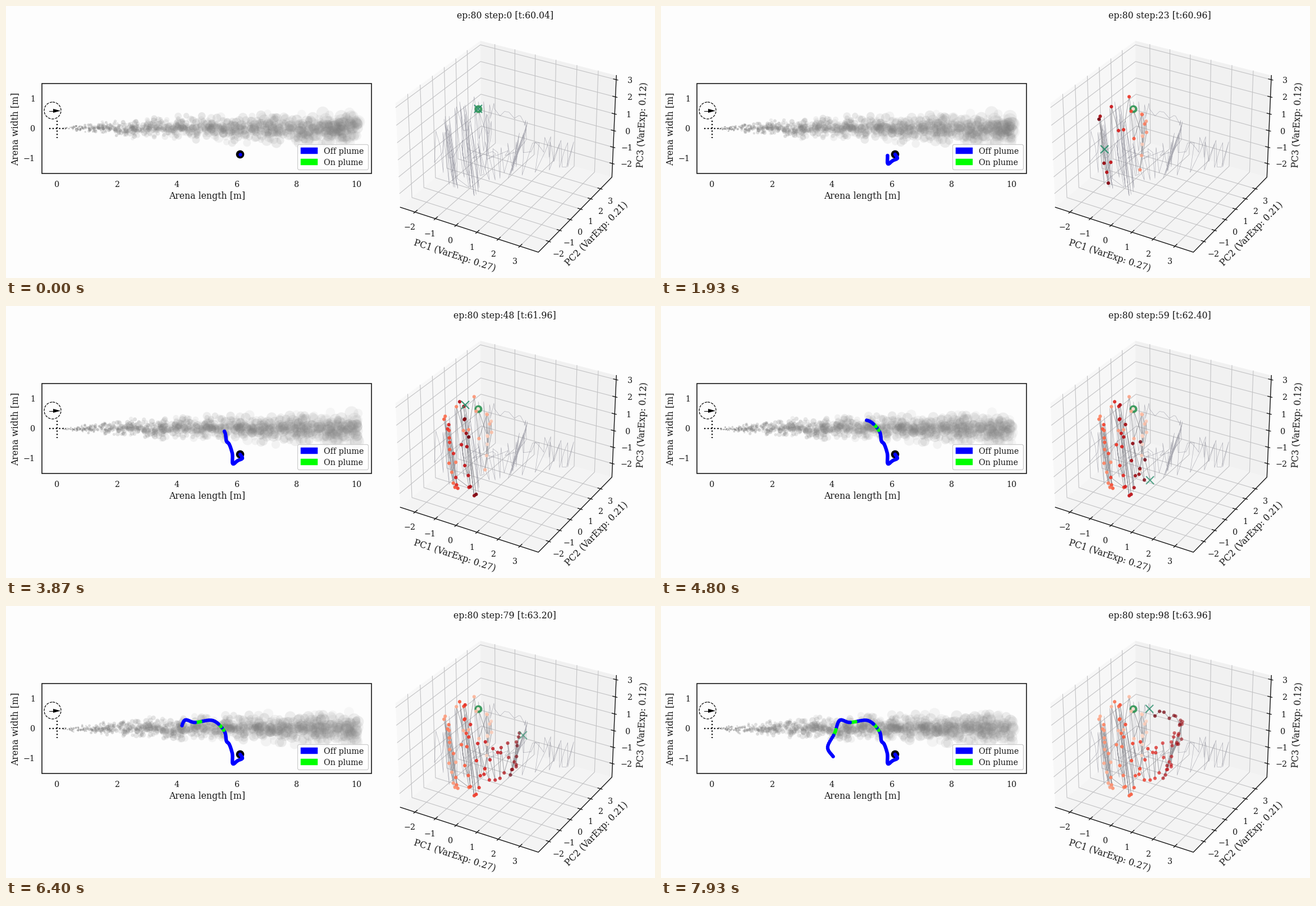
Recreate the animation shown at these times as a matplotlib script. Size 1156 px wide and 484 px high, loop 8 s.

```python
import numpy as np
import matplotlib.pyplot as plt
from matplotlib.animation import FuncAnimation
from matplotlib.patches import Circle, FancyBboxPatch, Polygon, Rectangle

W, H, DPI = 1156, 484, 64
PT = 72 / DPI                       # points per pixel
FRAMES, LOOP_MS = 120, 8000
BIG, SMALL = 15.7, 14.25            # text sizes in pixels
INK, GRID = "#141414", "#c2c2c4"
STEPS = np.arange(100)

plt.rcParams["font.family"] = "DejaVu Serif"
rng = np.random.default_rng(80)
fig = plt.figure(figsize=(W / DPI, H / DPI), dpi=DPI, facecolor="#fdfdfd")
ax = fig.add_axes([0, 0, 1, 1])
ax.set(xlim=(0, W), ylim=(H, 0))
ax.axis("off")


def label(x, y, text, size=SMALL, angle=0, ha="center"):
    """Text whose capitals are centred on (x, y)."""
    a, drop = np.radians(angle), 0.36 * size
    return ax.text(x + drop * np.sin(a), y + drop * np.cos(a), text, color=INK,
                   fontsize=size * PT, rotation=angle, rotation_mode="anchor",
                   ha=ha, va="baseline", zorder=9)


def line(points, color=INK, width=1.0, z=2, **kw):
    return ax.plot(*np.transpose(points), color=color, lw=width * PT, zorder=z, **kw)[0]


def dots(diameter, z):
    return ax.scatter([], [], s=(diameter * PT) ** 2, linewidths=0, zorder=z)


def signed(v):
    return str(v).replace("-", "\u2212")


def smooth(keys, t):
    """Cubic Hermite curve through rows of (time, x, y)."""
    k, p = keys[:, 0], keys[:, 1:]
    m = np.gradient(p, k, axis=0)
    i = np.clip(np.searchsorted(k, t, side="right") - 1, 0, len(k) - 2)
    h = (k[i + 1] - k[i])[:, None]
    u = (t - k[i])[:, None] / h
    return ((1 + 2 * u) * (1 - u) ** 2 * p[i] + u * (1 - u) ** 2 * h * m[i]
            + u ** 2 * (3 - 2 * u) * p[i + 1] + u ** 2 * (u - 1) * h * m[i + 1])


# ---------- arena ----------
UNIT, X0, Y0 = 53.35, 91.0, 218.0


def arena(x, y):
    return np.column_stack([X0 + UNIT * x, Y0 - UNIT * y])


ax.add_patch(Rectangle((64, 138), 587, 159.7, fill=False, ec=INK, lw=1.6 * PT, zorder=6))
for v in range(0, 11, 2):
    label(X0 + UNIT * v, 317, str(v))
for v in (-1, 0, 1):
    label(52, Y0 - UNIT * v, signed(v), ha="right")
label(358, 337, "Arena length [m]", BIG)
label(16, 219, "Arena width [m]", BIG, 90)

# wind compass and odour source
ax.add_patch(Circle((83, 186), 15, fill=False, ec="black", lw=1.2 * PT, ls="--", zorder=5))
line([(77, 186.5), (85, 186.5)], "black")
ax.add_patch(Polygon([(84, 183), (97, 186.5), (84, 190)], fc="black", lw=0, zorder=5))
line([(76.5, 218), (107, 218)], "black", 2.2, 5, ls=":")
line([(91, 203.5), (91, 235)], "black", 2.2, 5, ls=":")

# legend
ax.add_patch(FancyBboxPatch((522, 249), 121, 40, boxstyle="round,pad=2.5,rounding_size=3",
                            fc=(1, 1, 1, 0.8), ec="#cccccc", lw=1.2 * PT, zorder=7))
for y, color, name in ((257.5, "blue", "Off plume"), (277.7, "lime", "On plume")):
    ax.add_patch(Rectangle((525, y - 5.5), 30, 11, fc=color, ec=color, lw=0.5, zorder=8))
    label(566, y, name, ha="left")

# puffs drift downwind, widening and thinning as they go
N = 1150
birth = np.sort(rng.uniform(-2.0, 10.1, N))
spread = np.clip(rng.normal(0, 1, N), -2.4, 2.4)
swirl = rng.uniform(0, 2 * np.pi, N)
strength = rng.uniform(0.5, 1.25, N)
size_var = rng.uniform(0.65, 1.2, N)
puffs = ax.scatter([], [], linewidths=0, zorder=2)


def draw_plume(step):
    x = birth + 0.02 * step
    on = (x > 0.2) & (x < 10.05)
    x = x[on]
    sigma = 0.22 * (1 - np.exp(-x / 3))
    y = sigma * (spread[on] + 0.2 * np.sin(swirl[on] + 1.3 * x))
    y += 0.02 * np.sin(1.9 * birth[on])
    radius = np.maximum(2.1 * x ** 0.7, 0.8) * size_var[on]
    rgba = np.full((len(x), 4), 0.5)
    rgba[:, 3] = np.clip(0.34 / np.sqrt(x), 0, 0.5) * strength[on]
    puffs.set_offsets(arena(x, y))
    puffs.set_sizes((2 * radius * PT) ** 2)
    puffs.set_facecolors(rgba)


# agent track through a few (step, x, y) points
TRACK = np.array([(0, 417, 264), (4, 421, 271), (8, 413, 275), (14, 405, 281),
                  (25, 403, 262), (34, 397, 245), (39, 393, 241), (48, 389, 223),
                  (58, 369, 204), (69, 334, 207), (75, 319, 203), (83, 309, 227),
                  (90, 297, 250), (99, 308, 270)])
track = smooth(TRACK, STEPS)
BURSTS = np.array([49.5, 52.5, 66, 82])
smelled = np.abs(STEPS[:, None] - BURSTS).min(axis=1) < 1.1
track_rgb = np.where(smelled[:, None], (0, 1, 0), (0, 0, 1)).astype(float)
ax.add_patch(Circle(track[0], 7.3, fc="black", lw=0, zorder=3))
trail = dots(6.4, 4)

# ---------- neural state space ----------
LOW = np.array([-2.73, -2.95, -2.84])
HIGH = np.array([3.84, 4.19, 3.24])
BOX = np.array([1.1428, 1.1428, 0.8572])
AZIM, ELEV = np.radians(-60), np.radians(30)
ca, sa, ce, se = np.cos(AZIM), np.sin(AZIM), np.cos(ELEV), np.sin(ELEV)
VIEW = np.array([(-sa, ca, 0), (-se * ca, -se * sa, ce), (ca * ce, sa * ce, se)])


def project(*p):
    u, v, w = VIEW @ (((np.array(p) - LOW) / (HIGH - LOW) - 0.5) * BOX)
    k = 246.5 * 10 / (10 - w)
    return np.array([894.2 + k * u, 241.3 - k * v])


(xl, yl, zl), (xh, yh, zh) = LOW, HIGH
panes = (
    ([(xl, yl, zl), (xl, yh, zl), (xl, yh, zh), (xl, yl, zh)], "0.95"),
    ([(xl, yh, zl), (xh, yh, zl), (xh, yh, zh), (xl, yh, zh)], "0.90"),
    ([(xl, yl, zl), (xh, yl, zl), (xh, yh, zl), (xl, yh, zl)], "0.925"))
for corners, gray in panes:
    ax.add_patch(Polygon([project(*c) for c in corners], fc=gray, alpha=0.5, lw=0, zorder=0))


def tick(p, toward):
    d = (toward - p) / np.hypot(*(toward - p))
    line([p - 3 * d, p + 5 * d], INK, 1.3, 3)


for v in range(-2, 4):
    grids = ([(v, yl, zl), (v, yh, zl), (v, yh, zh)],
             [(xh, v, zl), (xl, v, zl), (xl, v, zh)],
             [(xl, yl, v), (xl, yh, v), (xh, yh, v)])
    for g in grids:
        line([project(*p) for p in g], GRID, 1.1, 1)
    px, py, pz = project(v, yl, zl), project(xh, v, zl), project(xh, yh, v)
    tick(px, project(v, yh, zl))
    tick(py, project(xl, v, zl))
    tick(pz, project(xl, yh, v))
    for p, (dx, dy) in ((px, (-9.5, 26)), (py, (17, 22)), (pz, (24.5, 0.5))):
        label(p[0] + dx, p[1] + dy, signed(v))
line([project(*p) for p in ((xl, yl, zl), (xh, yl, zl), (xh, yh, zl), (xh, yh, zh))], INK, 1.4, 3)
label(800, 443, "PC1 (VarExp: 0.27)", BIG, -18)
label(1051, 405, "PC2 (VarExp: 0.21)", BIG, 45.7)
label(1132.5, 211, "PC3 (VarExp: 0.12)", BIG, 87.5)
title = label(888.7, 16.5, "", BIG)

# the state swings between two slowly moving ends: (step, x, y, x, y)
ENDS = np.array([
    (0, 841, 183, 862, 240), (8, 874, 195, 855, 290), (13, 833, 157, 833, 200),
    (18, 780, 192, 798, 330), (33, 786, 205, 805, 322), (34, 822, 327, 822, 327),
    (36, 806, 168, 824, 326), (48, 816, 160, 842, 340), (53, 838, 240, 850, 320),
    (70, 911, 240, 908, 295), (82, 932, 200, 891, 307), (88, 930, 208, 926, 244),
    (92, 915, 195, 925, 203), (99, 866, 175, 866, 190),
    (112, 832, 165, 842, 335), (130, 783, 195, 798, 325), (138, 766, 222, 768, 285),
    (150, 880, 262, 845, 270), (160, 950, 235, 955, 262), (175, 1010, 240, 1003, 300),
    (190, 912, 215, 893, 300)])
PERIOD = 3.18
all_steps = np.arange(191)
rails = np.column_stack([np.interp(all_steps, ENDS[:, 0], c) for c in ENDS[:, 1:].T])
mix = (0.5 - 0.5 * np.cos(2 * np.pi * all_steps / PERIOD))[:, None]
path = rails[:, :2] * (1 - mix) + rails[:, 2:] * mix
path[1:] += rng.normal(0, 2, (190, 2))
state = path[:100]
line(path, "#8c8c98", 0.6, 2, alpha=0.7)

walked = line(state[:1], "#808080", 1.0, 3, alpha=0.4)
visited = dots(6.2, 5)
fade = np.clip(1 - (state[:, 0] - 820) / 260, 0.5, 0.95)
line(state[:1], "#27924f", 1, 4, marker="o", ms=9.6 * PT, mfc="none",
     mew=4.2 * PT, alpha=0.88)
cross = line(state[:1], "#2a8f6c", 1, 6, marker="x", ms=14.5 * PT, mew=2 * PT)


def update(frame):
    step = max(0, (5 * frame - 1) // 6)
    title.set_text(f"ep:80 step:{step} [t:{60.04 + 0.04 * step:.2f}]")
    draw_plume(step)
    trail.set_offsets(track[:step + 1])
    trail.set_facecolors(track_rgb[:step + 1])
    walked.set_data(*state[:step + 1].T)
    age = np.arange(step) / max(step - 1, 1)
    rgba = plt.cm.Reds(0.12 + 0.86 * age)
    rgba[:, 3] = fade[:step]
    visited.set_offsets(state[:step])
    visited.set_facecolors(rgba)
    cross.set_data(*state[step:step + 1].T)
    cross.set_alpha(fade[step])
    return title, puffs, trail, walked, visited, cross


anim = FuncAnimation(fig, update, frames=FRAMES, interval=LOOP_MS / FRAMES,
                     repeat=True, repeat_delay=0)
plt.show()
```
